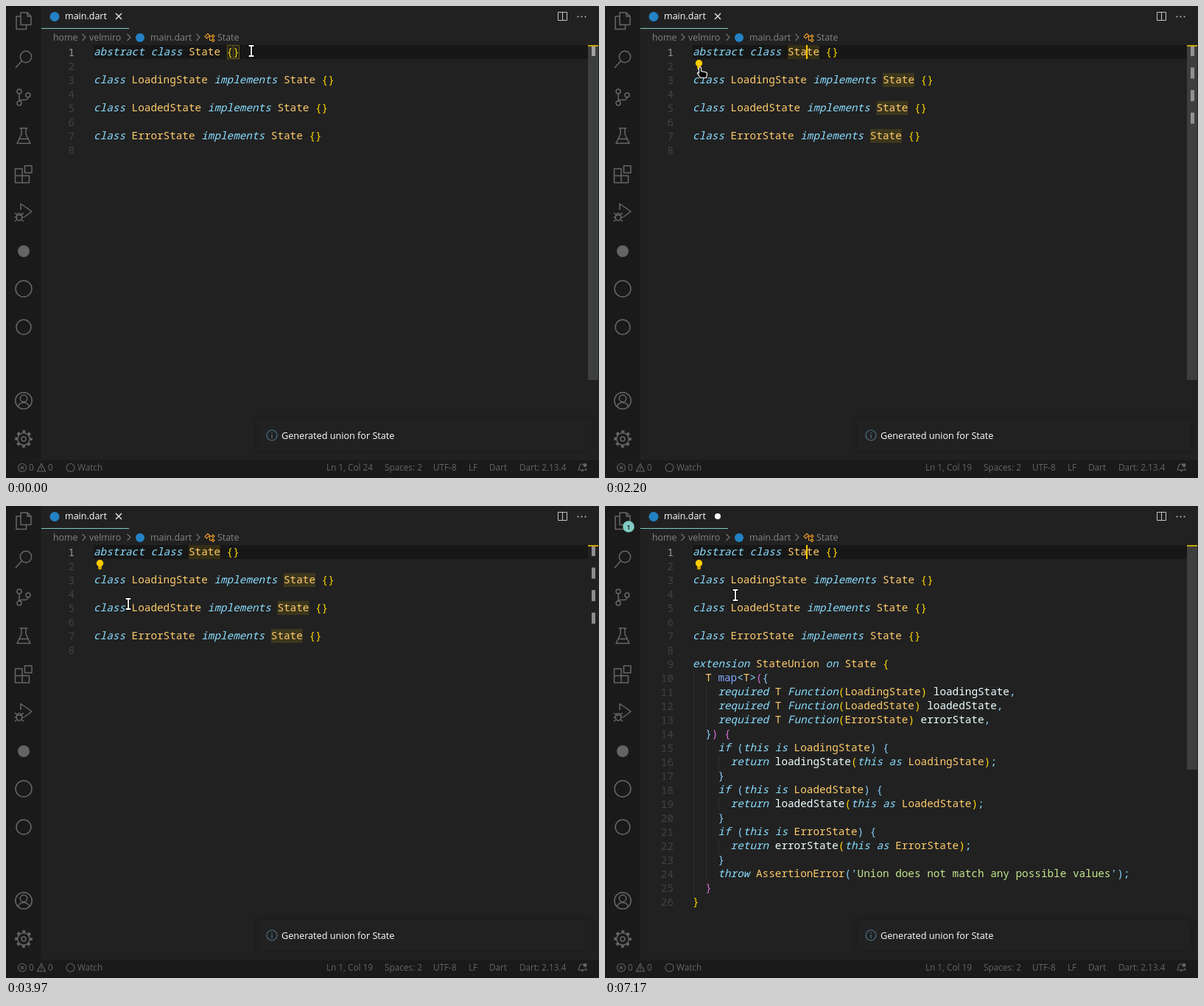
Recreate the animation shown at these times as an HTML page. Size 805 px wide and 641 px high, loop 7530 ms.

```html
<!DOCTYPE html>
<html lang="en">
<head>
<meta charset="utf-8">
<title>Editor: generate union class</title>
<style>
html, body { margin: 0; width: 100%; height: 100%; overflow: hidden; background: #212121; }
svg { display: block; width: 805px; height: 641px; }
text { font: 12.4px "Open Sans", "Noto Sans", sans-serif; }
.code text, .nums text { font: 14.333px "Noto Sans Mono", "DejaVu Sans Mono", monospace; }
.code .kw { font-style: italic; }
.nums text { fill: #424242; text-anchor: end; }
.crumbs text { fill: #848484; }
.status text { font-size: 11.75px; fill: #646464; }
.icon { fill: none; stroke: #676767; stroke-width: 1.5; stroke-linejoin: round; }
.thin { fill: none; stroke: #646464; stroke-width: 1.1; }
.mark { fill: #646464; }
.dart { fill: #2382c4; }
.thumb { fill: #3d3f3f; }

/* one loop: 7530 ms; percentages are ms / 75.3 */
.a { animation: 7530ms step-end infinite; }
.before-click { animation-name: beforeClick; }
.after-click { animation-name: afterClick; }
.uses { animation-name: uses; }
.bulb { animation-name: bulb; }
.before-edit { animation-name: beforeEdit; }
.after-edit { animation-name: afterEdit; }
.first-caret { animation-name: firstCaret; }
.caret { animation-name: caret; }
.menu { animation-name: menu; }
.items { animation-name: items; }
.hover1 { animation-name: hover1; }
.hover2 { animation-name: hover2; }
.beam { animation-name: beam; }
.hand { animation-name: hand; }
.arrow { animation-name: arrow; }
.pair { animation-name: pair; fill: var(--c); }
.slider { animation-name: fade; animation-timing-function: linear; }
.toast { animation-name: toast; }
.mouse { animation-name: mouse; animation-timing-function: linear; }

@keyframes beforeClick { 0% { opacity: 1 } 16.86%, to { opacity: 0 } }
@keyframes afterClick { 0% { opacity: 0 } 16.86%, to { opacity: 1 } }
@keyframes uses { 0% { opacity: 0 } 18.99% { opacity: 1 } 55.37%, to { opacity: 0 } }
@keyframes bulb { 0% { opacity: 0 } 20.31%, to { opacity: 1 } }
@keyframes beforeEdit { 0% { opacity: 1 } 55.37%, to { opacity: 0 } }
@keyframes afterEdit { 0% { opacity: 0 } 55.37%, to { opacity: 1 } }
@keyframes firstCaret { 0% { opacity: 0 } 3.58% { opacity: 1 } 10.22%, to { opacity: 0 } }
@keyframes caret {
  0%, 23.5%, 35.45%, 48.2%, 62.01%, 75.29%, 88.57% { opacity: 0 }
  16.86%, 29.21%, 42.09%, 55.37%, 68.65%, 81.4%, 95.21%, to { opacity: 1 }
}
@keyframes menu { 0% { opacity: 0 } 35.45% { opacity: 1 } 52.72%, to { opacity: 0 } }
@keyframes items { 0% { opacity: 0 } 36.25%, to { opacity: 1 } }
@keyframes hover1 { 0% { opacity: 0 } 40.3% { opacity: 1 } 45.15%, to { opacity: 0 } }
@keyframes hover2 { 0% { opacity: 0 } 45.15%, to { opacity: 1 } }
@keyframes beam { 0% { opacity: 1 } 28% { opacity: 0 } 52.72%, to { opacity: 1 } }
@keyframes hand { 0% { opacity: 0 } 28% { opacity: 1 } 36.25%, to { opacity: 0 } }
@keyframes arrow { 0% { opacity: 0 } 36.25% { opacity: 1 } 52.72%, to { opacity: 0 } }
@keyframes pair { 0% { fill: #89ddff } 58.83%, to { fill: var(--c) } }
@keyframes fade { 0%, 34.53% { opacity: 1 } 45.15%, to { opacity: 0 } }
@keyframes toast {
  0% { opacity: 1; transform: none }
  55.77% { opacity: 0; transform: translateY(42px); animation-timing-function: ease-out }
  59.75%, to { opacity: 1; transform: none }
}
@keyframes mouse {
  0%, 3.58% { transform: translate(333px, 61px) }
  10.62%, 22.16% { transform: translate(275px, 61px) }
  22.17%, 22.97% { transform: translate(271px, 61px) }
  24% { transform: translate(247px, 59px) }
  26.5% { transform: translate(165px, 85px) }
  28% { transform: translate(134px, 88px) }
  29.21%, 38.51% { transform: translate(129px, 83px) }
  41% { transform: translate(145px, 103px) }
  43.81%, 45.14% { transform: translate(161px, 121px) }
  45.15%, 46.87% { transform: translate(160px, 141px) }
  48.2%, 57.6% { transform: translate(166px, 133px) }
  59.75%, to { transform: translate(177px, 121px) }
}
</style>
</head>
<body>
<svg viewBox="0 0 805 641">
  <defs>
    <clipPath id="toastArea"><rect x="325" y="550" width="480" height="57"/></clipPath>
    <filter id="soft" x="-5%" y="-40%" width="110%" height="180%"><feGaussianBlur stdDeviation="3"/></filter>
  </defs>

  <rect width="805" height="641" fill="#212121"/>
  <rect width="48" height="616" fill="#1a1a1a"/>
  <rect y="616" width="805" height="25" fill="#1a1a1a"/>
  <path d="M47.500 0V616M0 616.500H805" stroke="#1e1e1e"/>

  <!-- activity bar -->
  <g class="icon">
    <path d="M20 9H29L34 14V25.500H20ZM29 9V14H34M20 14H14V31.500H27.500V26"/>
    <circle cx="27" cy="69" r="7.700"/><path d="M21.500 74.500L13 84"/>
    <circle cx="18" cy="116" r="3"/><circle cx="30" cy="121" r="3"/><circle cx="18" cy="132" r="3"/>
    <path d="M18 119V129M30 124Q29.500 127.500 26 127.500H22Q18.500 127.500 18 129"/>
    <path d="M18.500 166H29.500M21 166V174L15 186.500H33L27 174V166M18 180.500H30"/>
    <path d="M12.500 221H22V230.500H31.500V240H12.500ZM12.500 230.500H22V240M25.500 217H35V226.500H25.500Z"/>
    <path d="M20 277V268.500L35 279L25 286.500"/>
    <ellipse cx="18" cy="286.500" rx="3.700" ry="5"/>
    <path d="M14.500 284H21.500M12 281L15 283.500M24 281L21 283.500M11.500 287H14M22 287H24.500M12 292.500L15 290M24 292.500L21 290" stroke-width="1.300"/>
    <circle cx="24" cy="384" r="11"/><circle cx="24" cy="436" r="10"/>
    <circle cx="24" cy="536" r="11.200"/><circle cx="24" cy="533" r="4.700"/><path d="M16.500 544Q18 538.500 24 538.500T31.500 544"/>
    <circle cx="24" cy="588" r="8.300"/><circle cx="24" cy="588" r="3"/>
    <circle cx="24" cy="588" r="10.300" stroke-width="3" stroke-dasharray="4.045" stroke-dashoffset="2"/>
  </g>
  <circle class="mark" cx="24" cy="333" r="8"/>
  <g class="a after-edit">
    <circle cx="32" cy="28" r="7.800" fill="#80cbc4"/>
    <text x="32" y="31.500" text-anchor="middle" style="font-size:9px;font-weight:600" fill="#111">1</text>
  </g>

  <!-- tab and breadcrumbs -->
  <rect x="48" y="30" width="119" height="1" fill="#80cbc4"/>
  <circle class="dart" cx="66" cy="14.500" r="6.500"/>
  <text x="80" y="18" fill="#fff" style="font-size:12.500px">main.dart</text>
  <path class="a before-edit" d="M149 10L157 18M157 10L149 18" stroke="#eee" stroke-width="1.300"/>
  <circle class="a after-edit" cx="153" cy="14" r="4" fill="#fff"/>
  <path d="M749.500 8.500H761.500V19.500H749.500ZM755.500 8.500V19.500" fill="none" stroke="#c5c5c5"/>
  <g fill="#c5c5c5"><circle cx="776.500" cy="14.500" r="1"/><circle cx="781.500" cy="14.500" r="1"/><circle cx="786.500" cy="14.500" r="1"/></g>
  <g class="crumbs">
    <text x="64" y="47">home</text>
    <text x="113" y="47">velmiro</text>
    <text x="196" y="47">main.dart</text>
    <text x="287" y="47">State</text>
    <path d="M103.500 38L108 42.500L103.500 47M164.500 38L169 42.500L164.500 47M258.500 38L263 42.500L258.500 47" fill="none" stroke="#777" stroke-width="1.100"/>
    <circle class="dart" cx="182" cy="43" r="6"/>
    <path d="M270 41.500L274 37.500L276.500 40L272.500 44ZM275.500 41H279M276.500 41V46.500H279M279 41L281 39L283 41L281 43ZM279 46.500L281 44.500L283 46.500L281 48.500Z" fill="none" stroke="#ee9d28" stroke-width="1.100"/>
  </g>

  <!-- editor -->
  <rect x="119" y="53" width="671" height="19" fill="#171717"/>
  <g id="uses" class="a uses" fill="#ffcc00" fill-opacity=".125"></g>
  <g class="a before-click" fill="#212121" stroke="#665717">
    <rect x="300.500" y="53.500" width="8" height="18"/><rect x="308.500" y="53.500" width="8" height="18"/>
  </g>
  <g class="nums" id="nums"></g>
  <g class="nums a after-edit" id="newNums"></g>
  <g class="code" id="code"></g>
  <g class="code a after-edit" id="newCode">
    <path d="M120.500 224V528M137.500 243V300M137.500 319V509M154.500 338V357M154.500 395V414M154.500 452V471" stroke="#2f2f2f"/>
  </g>
  <g class="a bulb">
    <path d="M125 81.500H130V85.500Q127.500 87.500 125 85.500Z" fill="#c9a000"/>
    <circle cx="127.500" cy="77.800" r="4.700" fill="#fc0"/>
  </g>
  <rect class="a first-caret" x="316" y="53" width="2" height="19" fill="#fc0"/>
  <rect class="a caret" x="273" y="53" width="2" height="19" fill="#fc0"/>

  <!-- scrollbar and ruler -->
  <rect class="a slider thumb" x="790" y="53" width="14" height="455"/>
  <rect class="a after-edit thumb" x="790" y="53" width="14" height="305"/>
  <rect class="a before-click" x="795" y="53" width="5" height="15" fill="#a0a0a0"/>
  <g id="ruler" class="a uses" fill="#a0a0a0" fill-opacity=".85"></g>
  <rect x="790" y="53" width="14" height="2" fill="#c9a500"/>

  <!-- notification -->
  <g clip-path="url(#toastArea)">
    <g class="a toast">
      <rect x="343" y="562" width="452" height="42" fill="#1c1c1c" filter="url(#soft)"/>
      <rect x="343" y="562" width="452" height="42" fill="#212121"/>
      <circle cx="361" cy="583" r="7" fill="none" stroke="#4d7186" stroke-width="1.200"/>
      <path d="M361 582V587M361 579V580.500" stroke="#4d7186" stroke-width="1.300"/>
      <text x="374" y="588" fill="#fff" style="font-size:12.650px">Generated union for State</text>
    </g>
  </g>

  <!-- status bar -->
  <g class="status">
    <g class="thin">
      <circle cx="22" cy="627" r="5.500"/><path d="M19.800 624.800L24.200 629.200M24.200 624.800L19.800 629.200"/>
      <path d="M48 621.500L53.500 632H42.500ZM48 625V629M48 630V631"/>
      <circle cx="87.500" cy="627" r="5.500"/>
      <path d="M784 622.500Q778.500 620.500 778.500 626L777 630H788L786.500 627.500M781 630.500Q782.500 633 784 630.500"/>
    </g>
    <circle class="mark" cx="786" cy="623.500" r="2.500"/>
    <text x="31" y="631">0</text>
    <text x="57" y="631">0</text>
    <text x="97" y="631">Watch</text>
    <text class="a before-click" x="435" y="631">Ln 1, Col 24</text>
    <text class="a after-click" x="435" y="631">Ln 1, Col 19</text>
    <text x="514" y="631">Spaces: 2</text>
    <text x="580" y="631">UTF-8</text>
    <text x="628" y="631">LF</text>
    <text x="656" y="631">Dart</text>
    <text x="697" y="631">Dart: 2.13.4</text>
  </g>

  <!-- quick-fix menu -->
  <g class="a menu">
    <rect x="131" y="94" width="186" height="56" fill="#f5f6f7"/>
    <g class="a items">
      <rect x="131.500" y="94.500" width="185" height="55" fill="#fff" stroke="#e4e6ea"/>
      <g fill="#5c616c">
        <text x="156" y="115">Convert class to a mixin</text>
        <text x="156" y="139">Generate union class</text>
      </g>
      <g class="a hover1">
        <rect x="132" y="98" width="184" height="24" fill="#5294e2"/>
        <text x="156" y="115" fill="#fff">Convert class to a mixin</text>
      </g>
      <g class="a hover2">
        <rect x="132" y="122" width="184" height="24" fill="#5294e2"/>
        <text x="156" y="139" fill="#fff">Generate union class</text>
      </g>
    </g>
  </g>

  <!-- pointer -->
  <g class="a mouse">
    <g class="a beam" fill="none" stroke-linecap="square">
      <path d="M-2.500 -7H2.500M0 -7V7M-2.500 7H2.500" stroke="#000" stroke-width="4"/>
      <path d="M-2.500 -7H2.500M0 -7V7M-2.500 7H2.500" stroke="#fff" stroke-width="1.800"/>
    </g>
    <path class="a hand" d="M-1.500 1Q0 -1 1.500 1V5.500L8 7Q10 7.500 9.500 10L8.500 14.500H0.500L-3.500 8.500Q-3 6.500 -1.500 8Z" fill="#000" stroke="#fff" stroke-width="1.200"/>
    <path class="a arrow" d="M0 0V14.500L3.300 11.500L5.800 17.500L8.300 16.500L5.800 10.700H10.500Z" fill="#111" stroke="#fff" stroke-width=".9"/>
  </g>
</svg>

<script>
const CHAR = 8.6, LINE = 19, LEFT = 119, TOP = 53;
const CYAN = '#89ddff', PAIRS = ['#ffd700', '#da70d6', '#87cefa'];
const KEYWORDS = new Set(('abstract class implements extension on required Function ' +
  'if this is return as throw').split(' '));
const states = ['LoadingState', 'LoadedState', 'ErrorState'];
const param = s => s[0].toLowerCase() + s.slice(1);

const start = ['abstract class State {}', '',
  ...states.flatMap(s => [`class ${s} implements State {}`, ''])];
const added = ['extension StateUnion on State {', '  T map<T>({',
  ...states.map(s => `    required T Function(${s}) ${param(s)},`),
  '  }) {',
  ...states.flatMap(s => [`    if (this is ${s}) {`, `      return ${param(s)}(this as ${s});`, '    }']),
  "    throw AssertionError('Union does not match any possible values');", '  }', '}'];

const $ = id => document.getElementById(id);

function add(parent, tag, attrs, text = '') {
  const el = document.createElementNS('http://www.w3.org/2000/svg', tag);
  for (const key in attrs) el.setAttribute(key, attrs[key]);
  el.textContent = text;
  parent.append(el);
  return el;
}

function color(word) {
  if (KEYWORDS.has(word)) return CYAN;
  if (word === 'map') return '#82aaff';
  if (/^[A-Z]/.test(word)) return '#ffcb6b';
  return /^\w/.test(word) ? '#eeffff' : CYAN;
}

function write(lines, first, code, nums, late) {
  let depth = 0;
  lines.forEach((line, i) => {
    const row = first + i, y = TOP + 14 + row * LINE;
    const num = add(nums, 'text', { x: 93, y: y + 1 }, row + 1);
    if (row === 0) num.style.fill = '#9a9a9a';

    const put = (word, col, fill) => add(code, 'text', { x: LEFT + col * CHAR, y, fill }, word);
    for (const { 0: word, index } of line.matchAll(/'[^']*'|\w+|[^\s\w]/g)) {
      if (word[0] === "'") {
        put("'", index, CYAN);
        put(word.slice(1, -1), index + 1, '#c3e88d');
        put("'", index + word.length - 1, CYAN);
      } else if (/[(){}]/.test(word)) {
        if (/[)}]/.test(word)) depth--;
        const pair = PAIRS[depth % 3];
        if (/[({]/.test(word)) depth++;
        const el = put(word, index, pair);
        if (late) {
          el.setAttribute('class', 'a pair');
          el.style.setProperty('--c', pair);
        }
      } else {
        const el = put(word, index, color(word));
        if (KEYWORDS.has(word)) el.setAttribute('class', 'kw');
      }
    }
  });
}

write(start, 0, $('code'), $('nums'), false);
write(added, start.length, $('newCode'), $('newNums'), true);

// every mention of State, in the text and on the ruler
start.forEach((line, row) => {
  const col = line.search(/\bState\b/);
  if (col < 0) return;
  add($('uses'), 'rect', { x: LEFT + col * CHAR, y: TOP + row * LINE, width: 5 * CHAR, height: LINE });
  add($('ruler'), 'rect', { x: 795, y: TOP + row / 2 * 30.6, width: 5, height: 15 });
});
</script>
</body>
</html>
```
